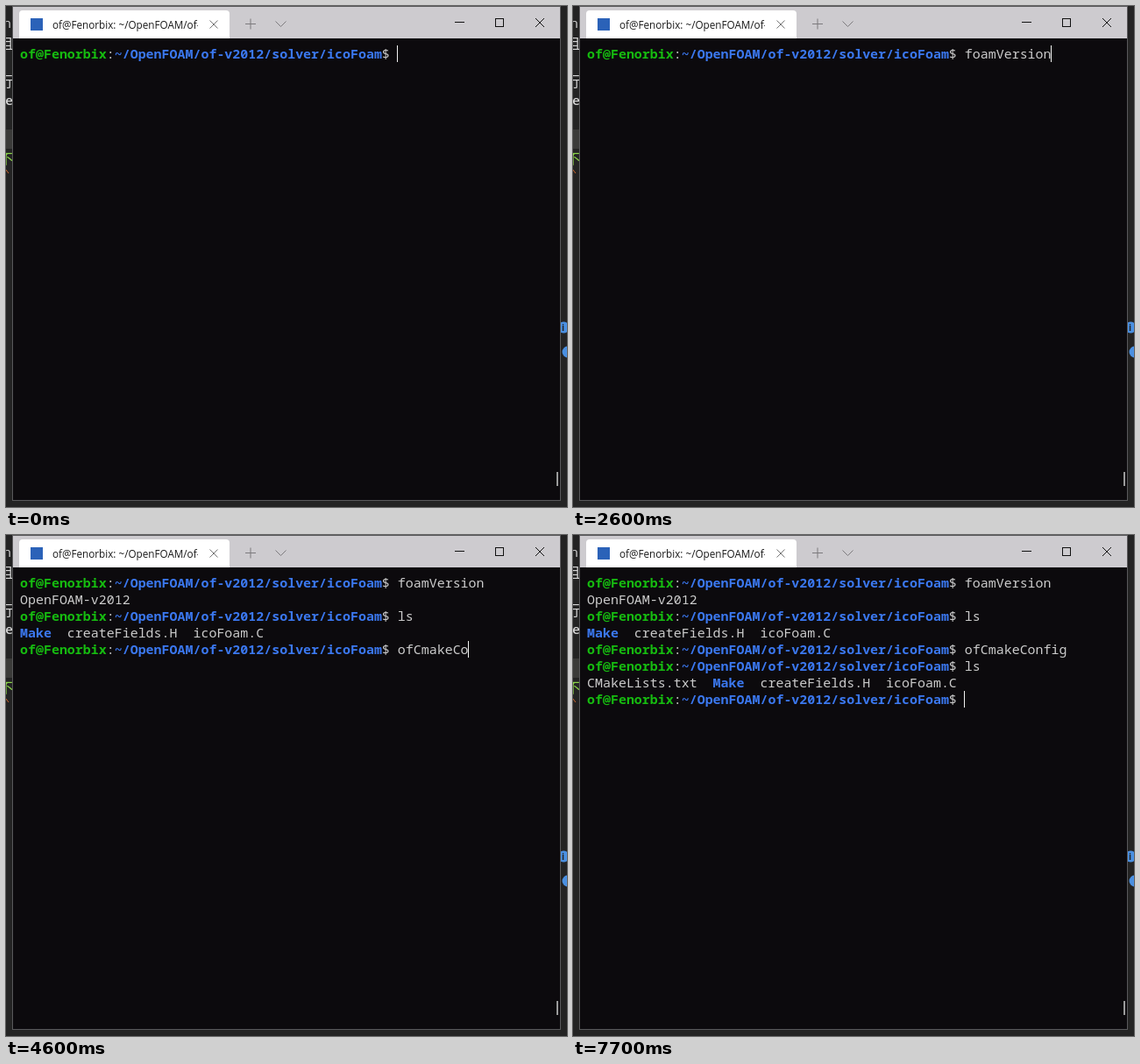
An HTML page with a canvas that plays this animation: 640x572 px, repeating every 8000 ms.

```html
<!DOCTYPE html>
<html lang="en">
<head>
<meta charset="utf-8">
<title>Terminal session</title>
<style>
  html, body { margin: 0; height: 100%; overflow: hidden; background: #232323; }
  canvas { display: block; }
</style>
</head>
<body>
<canvas id="stage" width="640" height="572"></canvas>
<script>
const ctx = document.getElementById('stage').getContext('2d');
const LOOP = 8000, CELL = 8.975, ROW = 19, LEFT = 16, BASE = 60;
const MONO = '14.95px "Noto Sans Mono", "DejaVu Sans Mono", monospace';
const HOST = 'of@Fenorbix';
// Style marks inside terminal text: ^g green, ^b blue, ^w plain
const STYLES = { g: ['#16bb10', '600 '], b: ['#3b78f0', '600 '], w: ['#cccccc', ''] };
const PROMPT = `^g${HOST}^w:^b~/OpenFOAM/of-v2012/solver/icoFoam^w$ `;

// Each event appends text to the terminal at a given time
const events = [];
const print = (time, text) => events.push([time, text]);
const type = (time, text) => [...text].forEach((ch, i) => print(time + i * 100, ch));

print(0, PROMPT);
type(1100, 'fo');
type(1600, 'am');
type(2000, 'Version');
print(2800, '\n');
print(2900, 'OpenFOAM-v2012\n' + PROMPT);
type(3000, 'ls');
print(3300, '\n^bMake^w  createFields.H  icoFoam.C\n' + PROMPT);
type(3600, 'o');
type(3800, 'f');
type(4000, 'CmakeCo');
type(4900, 'nfig');
print(5300, '\n');
print(5900, PROMPT);
type(6700, 'l');
print(6800, 's\nCMakeLists.txt  ^bMake^w  createFields.H  icoFoam.C\n' + PROMPT);

function rect(color, x, y, w, h) {
  ctx.fillStyle = color;
  ctx.fillRect(x, y, w, h);
}

function label(text, x, y, color, font, align = 'left') {
  ctx.font = font;
  ctx.fillStyle = color;
  ctx.textAlign = align;
  ctx.fillText(text, x, y);
}

function line(color, ...points) {
  ctx.strokeStyle = color;
  ctx.lineWidth = 1;
  ctx.beginPath();
  for (const [x, y] of points) ctx.lineTo(x, y);
  ctx.stroke();
}

function cross(color, x, y, r) {
  line(color, [x - r, y - r], [x + r, y + r]);
  line(color, [x - r, y + r], [x + r, y - r]);
}

function clipped(x, y, w, h, draw) {
  ctx.save();
  ctx.beginPath();
  ctx.rect(x, y, w, h);
  ctx.clip();
  draw();
  ctx.restore();
}

function disc(x, y) {
  ctx.fillStyle = '#4a90e2';
  ctx.beginPath();
  ctx.arc(x, y, 6.5, 0, 7);
  ctx.fill();
}

function drawDesktop() {
  rect('#232323', 0, 0, 640, 572);
  rect('#3b3b39', 0, 141, 7, 22);
  const cjk = '16px "Noto Sans CJK SC", "Noto Sans CJK", sans-serif';
  clipped(0, 0, 7, 572, () => {
    label('n', 6, 25, '#d8d8d8', '15px "Open Sans", sans-serif', 'right');
    label('且', 9, 49, '#d8d8d8', cjk, 'right');
    label('行', 8, 92, '#d8d8d8', cjk, 'right');
    label('ke', 8, 113, '#d8d8d8', '600 15px "Open Sans", sans-serif', 'right');
    label('不', 8, 180, '#8bd649', cjk, 'right');
    line('#d2692e', [0, 187], [3, 191]);
  });
  disc(636, 367);
  label('i', 635.5, 371, '#232323', 'bold 10px "Open Sans", sans-serif', 'center');
  disc(641, 395);
}

function drawWindow() {
  rect('#59595b', 7, 0, 626, 565);
  rect('#0c0a0d', 8, 1, 624, 563);
  rect('#cdcbcf', 8, 1, 624, 36);

  ctx.fillStyle = '#ffffff';
  ctx.beginPath();
  ctx.roundRect(15, 5, 240, 32, [4, 4, 0, 0]);
  ctx.fill();
  rect('#2b62b8', 28, 14, 14, 14);
  clipped(50, 8, 169, 26, () =>
    label(HOST + ': ~/OpenFOAM/of-v2012', 53, 26, '#1a1a1a', '11.7px "Open Sans", "Noto Sans", sans-serif'));
  cross('#777777', 237, 21, 4.5);

  line('#7c7a7d', [273, 20.5], [285, 20.5]);
  line('#7c7a7d', [279, 14.5], [279, 26.5]);
  line('#7c7a7d', [307.5, 17.5], [313.5, 23.5], [319.5, 17.5]);

  line('#111111', [512, 18.5], [523, 18.5]);
  ctx.strokeRect(558.5, 14.5, 9, 9);
  cross('#111111', 609, 19, 5);

  rect('#9b9b9b', 628, 532, 2, 16);
}

function drawTerminal(time) {
  const text = events.filter(e => e[0] <= time).map(e => e[1]).join('');
  let col = 0, row = 0, style = STYLES.w;
  for (let i = 0; i < text.length; i++) {
    const ch = text[i];
    if (ch === '^') {
      style = STYLES[text[++i]];
    } else if (ch === '\n') {
      col = 0;
      row++;
    } else {
      label(ch, LEFT + col++ * CELL, BASE + row * ROW, style[0], style[1] + MONO);
    }
  }
  rect('#f2f2f2', Math.round(LEFT + col * CELL - 0.4), 45 + row * ROW, 1, 19);
}

function frame() {
  const time = performance.now() % LOOP;
  drawDesktop();
  drawWindow();
  drawTerminal(time);
  requestAnimationFrame(frame);
}
frame();
</script>
</body>
</html>
```
